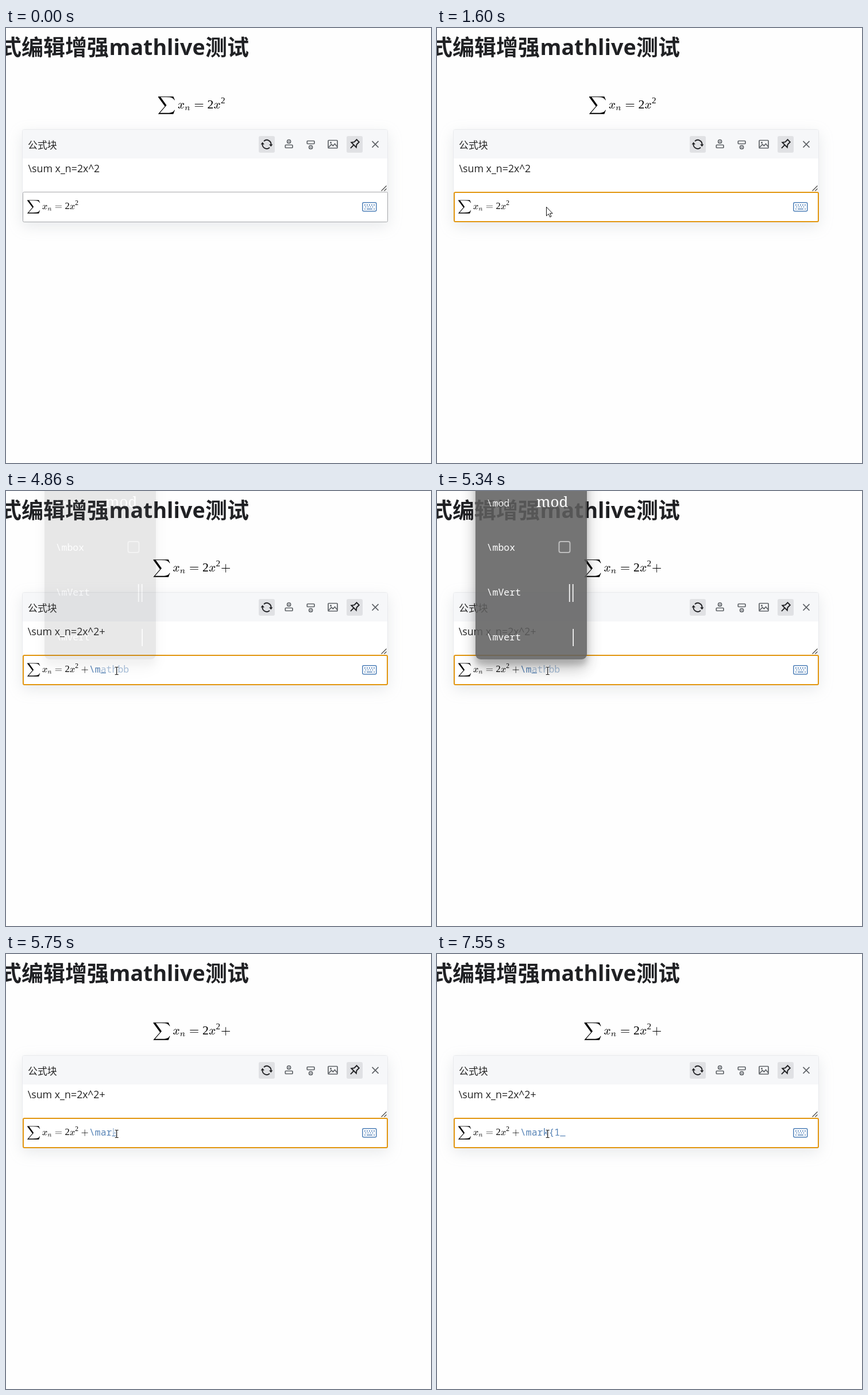
Animation of 740 by 757 pixels, one loop 8000 ms. Source, as an HTML page:

```html
<!DOCTYPE html>
<html lang="zh">
<head>
<meta charset="utf-8">
<title>mathlive</title>
<style>
html, body { margin: 0; width: 100%; height: 100%; overflow: hidden; background: #fefefe; }
svg { display: block; width: 740px; height: 757px; }
text { white-space: pre; }
.cjk { font-family: "Noto Sans CJK SC", "Noto Sans CJK JP", "Noto Sans CJK", sans-serif; }
.sans { font-family: "Open Sans", "Noto Sans", sans-serif; }
.mono { font: 16.55px "Noto Sans Mono", "DejaVu Sans Mono", monospace; }
.title { font-size: 38px; font-weight: 700; fill: #202124; }
.panel { filter: drop-shadow(0 8px 12px rgba(140, 149, 159, .2)); }
.box { filter: drop-shadow(0 14px 14px rgba(0, 0, 0, .25)) drop-shadow(0 10px 5px rgba(0, 0, 0, .22)); }
.icon { fill: none; stroke: #5f6368; stroke-width: 1.7; }
.icon.on { stroke: #202124; stroke-width: 1.9; }
.digit { font: 1000px "Liberation Serif", serif; }
.thin { fill: none; stroke: #111; stroke-width: 38; }
.thick { fill: none; stroke: #111; stroke-width: 76; }
</style>
</head>
<body>
<svg viewBox="0 0 740 757">
  <defs>
    <g id="x">
      <path class="thick" d="M306 350L246 78"/>
      <path class="thin" d="M72 285Q110 423 217 423Q300 423 305 345M246 80Q200 8 130 8Q85 12 60 60M310 330Q350 423 428 423Q480 420 500 375M246 80Q255 8 335 8Q450 12 487 150"/>
      <circle cx="89" cy="90" r="53"/><circle cx="468" cy="341" r="53"/>
    </g>
    <g id="n">
      <path class="thick" d="M190 365L113 22M380 405Q490 410 455 290Q390 110 388 55"/>
      <path class="thin" d="M42 285Q75 423 132 423Q195 423 192 350M215 290Q290 423 385 423M388 60Q390 8 440 8Q525 12 560 150"/>
    </g>
    <path id="eq" d="M56 327H722V367H56ZM56 133H722V173H56Z"/>
    <path id="plus" d="M56 230H369V-83H409V230H722V270H409V583H369V270H56Z"/>
    <g id="sum">
      <path d="M55 950H1267L1388 669H1348Q1290 795 1174 838Q1040 902 699 902H251L724 250L196-357H676Q960-357 1063-332Q1290-285 1348-124H1388L1267-450H60L55-435L590 177L55 910Z"/>
      <use href="#x" x="1611"/>
      <use href="#n" transform="translate(2183 -150) scale(.7)"/>
      <use href="#eq" x="2931"/>
      <text class="digit" transform="translate(3987 0) scale(1 -1)">2</text>
      <use href="#x" x="4487"/>
      <text class="digit" transform="translate(5059 413) scale(.7 -.7)">2</text>
    </g>
  </defs>

  <g class="title">
    <text class="cjk" x="-11" y="46.5">式编辑增强</text>
    <text class="sans" x="179.5" y="46.5" font-size="37.6">mathlive</text>
    <text class="cjk" x="347" y="46.5">测试</text>
  </g>
  <g id="block"><use href="#sum"/><use class="op"/></g>

  <rect class="panel" x="28.5" y="176.5" width="636" height="160" rx="3" fill="#fff" stroke="#e9eaed"/>
  <path d="M29 227V180Q29 177 32 177H661Q664 177 664 180V227Z" fill="#f6f7f9"/>
  <text class="cjk" x="38" y="209.5" font-size="16.9" fill="#222">公式块</text>
  <g fill="#e0e1e4">
    <rect x="440" y="188" width="28" height="29" rx="3"/>
    <rect x="593" y="188" width="28" height="29" rx="3"/>
  </g>
  <g transform="translate(454 202.5)">
    <path class="icon on" d="M-5 -5.5A7.4 7.4 0 0 1 7.4 1M5 5.5A7.4 7.4 0 0 1 -7.4 -1"/>
    <path d="M4 0H10.4L7.4 4ZM-4 0H-10.4L-7.4 -4Z" fill="#202124"/>
  </g>
  <g id="insert" class="icon">
    <rect x="486.3" y="203.5" width="12.6" height="5" rx="1"/>
    <circle cx="492.6" cy="197.5" r="3"/><path d="M492.6 196.5v2"/>
  </g>
  <use href="#insert" transform="translate(1023.2 405) rotate(180)"/>
  <g class="icon">
    <rect x="561" y="195.5" width="16" height="13.5" rx="1"/>
    <path d="M562 207.5l4.5-5 3 2.5 3-3.5 4 5"/><circle cx="565.5" cy="199.5" r=".7"/>
    <path d="M637.5 196.8l11 11m0-11l-11 11"/>
  </g>
  <path class="icon on" transform="translate(607 202) rotate(45)" d="M-4 -8H4M-3 -8V-2L-6 2H6L3 -2V-8M0 2V10"/>

  <text id="source" class="sans" y="250.6" font-size="17.8" fill="#222"></text>
  <path d="M653.5 283.5l9-9m-4 9l4-4" stroke="#444" stroke-width="1.2"/>
  <rect id="field" fill="#fff"/>
  <g transform="translate(36.1 315.3) scale(.01665 -.01665)"><use href="#sum"/><use class="op" id="fieldOp"/></g>
  <g fill="none" stroke="#4f80b8" stroke-width="1.5">
    <rect x="620.8" y="303.8" width="24" height="15" rx="2"/>
    <path d="M624 308h18M625.5 311.3h16" stroke-width="1.8" stroke-dasharray="1.8 2.2"/>
    <path d="M624 315h2m2 0h10m2 0h2"/>
  </g>
  <rect id="caret" y="300" width="1.7" height="20" fill="#34659c"/>
  <text class="mono" x="144.8" y="315.5" fill="#5683b6"><tspan id="typed"></tspan><tspan id="ghost" fill="#a9c0da"></tspan></text>
  <rect id="under" y="316" width="9.3" height="1.2" fill="#5683b6"/>
  <g id="popover"></g>
  <path id="arrow" d="M.5 .5V16L4.2 12.6L6.7 18L9 17L6.6 11.7H11.2Z" fill="#fff" stroke="#111"/>
  <g id="beam" fill="none">
    <path d="M-3 -6.5H3M-3 6.5H3M0 -6.5V6.5" stroke="#fff" stroke-width="2.6"/>
    <path d="M-3 -6.5H-1L0 -6L1 -6.5H3M-3 6.5H-1L0 6L1 6.5H3M0 -6V6" stroke="#111" stroke-width="1.2"/>
  </g>
</svg>
<script>
const $ = id => document.getElementById(id);
const LOOP = 8000, ADVANCE = 9.93, EM = .02178;
const show = (el, on) => el.setAttribute("visibility", on ? "visible" : "hidden");
const put = (el, attrs) => { for (const k in attrs) el.setAttribute(k, attrs[k]); };
const inside = (t, spans) => spans.some(([a, b]) => t >= a && t < b);
const lastAt = (t, list) => list.filter(s => t >= s[0]).pop();

// start, operator, its field gap, space in the block, width added to the block
const ops = [
  [0, "", 0, 0, 0], [2600, "=", 278, 278, 1056], [3460, "", 0, 0, 0], [4250, "+", 222, 0, 778]
];
const carets = [[1070, 1600], [2130, 3070], [3460, 3990], [4250, 4650]];
const commands = [
  [0, "", ""], [4650, "\\m", "athbb"], [5540, "\\ma", "thbb"], [5750, "\\mar", "k"],
  [6020, "\\mark", ""], [7030, "\\mark{", ""], [7550, "\\mark{1", ""]
];

const label = (x, y, s) => `<text class="mono" x="${x}" y="${y}" fill="#fff">${s}</text>`;
const box = (x, y, w, h) => `<rect class="box" x="${x}" y="${y}" width="${w}" height="${h}" rx="9" fill="#5f5f5f"/>`;
const list = (x, w, names) => box(x, -120, w, 413) +
  names.map((s, i) => label(x + 19.6, 26.5 + i * 77.7, "\\" + s)).join("");
const samples = `<text x="173" y="28" font-family="Noto Serif, serif" font-size="26" fill="#fff">mod</text>
  <rect x="212.5" y="88" width="19" height="19" rx="3" fill="none" stroke="#b5b5b5" stroke-width="2"/>
  <path d="M230.7 162v31m6 -31v31m.5 47v30" stroke="#fff" stroke-width="1.6"/>`;
const single = x => box(x, 326, 105, 77.5) +
  `<path d="M${x + 47} 326.5l7 -6l7 6Z" fill="#5f5f5f"/>` + label(x + 20.5, 370, "\\mark");
const popovers = [
  [0, ""],
  [4790, list(67, 194, ["mod", "mbox", "mVert", "mvert"]) + samples],
  [5540, list(96, 155.5, ["mathsf", "mathtt", "mathcal", "mathscr"])],
  [5750, ""], [5820, single(129)], [6020, single(138.5)], [7090, ""]
];

function popoverOpacity(t) {
  if (t < 5540) return 1 - Math.max(0, 1 - Math.max(0, t - 4790) / 750) ** 1.5;
  if (t < 5820) return Math.min(.94, .8 + (t - 5540) / 500);
  return t < 7030 ? Math.min(.97, .2 + (t - 5820) / 250) : .4;
}

// The pointer moves in steps of one screen sample.
function pointer(t) {
  const step = (from, n, ms) => Math.min(1, Math.max(0, Math.floor((t - from) / ms) / n));
  if (t < 600) {
    const p = step(140, 5, 64), e = 1 - (1 - p) ** 1.4;
    return [677 - 519 * e, 736 - 490 * e];
  }
  const p = Math.min(1, step(600, 10, 67) + .1), e = 1 - (1 - p) ** 2;
  return [158 + 32 * e, 246 + 65 * e];
}

let open = "";
function draw(t) {
  const [, op, gap, space, extra] = lastAt(t, ops);
  const href = op === "=" ? "#eq" : op === "+" ? "#plus" : "";
  document.querySelectorAll(".op").forEach(el => {
    put(el, { href, x: 5459 + (el.id ? gap : space) });
    show(el, !!op);
  });
  put($("block"), { transform: `translate(${323.2 - (5459 + extra) * EM / 2} 140) scale(${EM} ${-EM})` });
  $("source").textContent = "\\sum x_n=2x^2" + op;
  put($("source"), { x: t < 2600 ? 38.5 : 37.7 });

  const focus = t >= 1070;
  put($("field"), focus
    ? { x: 30, y: 286, width: 634, height: 51, rx: 2, stroke: "#e2960f", "stroke-width": 2 }
    : { x: 29.5, y: 285.5, width: 635, height: 52, rx: 2, stroke: "#a5a7aa", "stroke-width": 1 });
  put($("caret"), { x: op === "=" ? 144.2 : op ? 143.6 : 126.2 });
  show($("caret"), inside(t, carets));

  const [, typed, ghost] = lastAt(t, commands);
  $("typed").textContent = typed;
  $("ghost").textContent = ghost;
  put($("under"), { x: 144.8 + typed.length * ADVANCE });
  show($("under"), typed && !inside(t, [[6490, 7030]]));

  const content = lastAt(t, popovers)[1];
  if (content !== open) $("popover").innerHTML = open = content;
  put($("popover"), { opacity: popoverOpacity(t) });

  const [x, y] = pointer(t);
  const typing = t >= 4790, overText = t < 1070 && y > 227 && y < 285 && x < 650;
  put($("arrow"), { transform: `translate(${x} ${y})` });
  put($("beam"), { transform: typing ? "translate(192.7 313)" : `translate(${x} ${y})` });
  show($("arrow"), t >= 140 && !typing && !overText);
  show($("beam"), typing || overText);
}

function frame() {
  draw(performance.now() % LOOP);
  requestAnimationFrame(frame);
}
frame();
</script>
</body>
</html>
```
